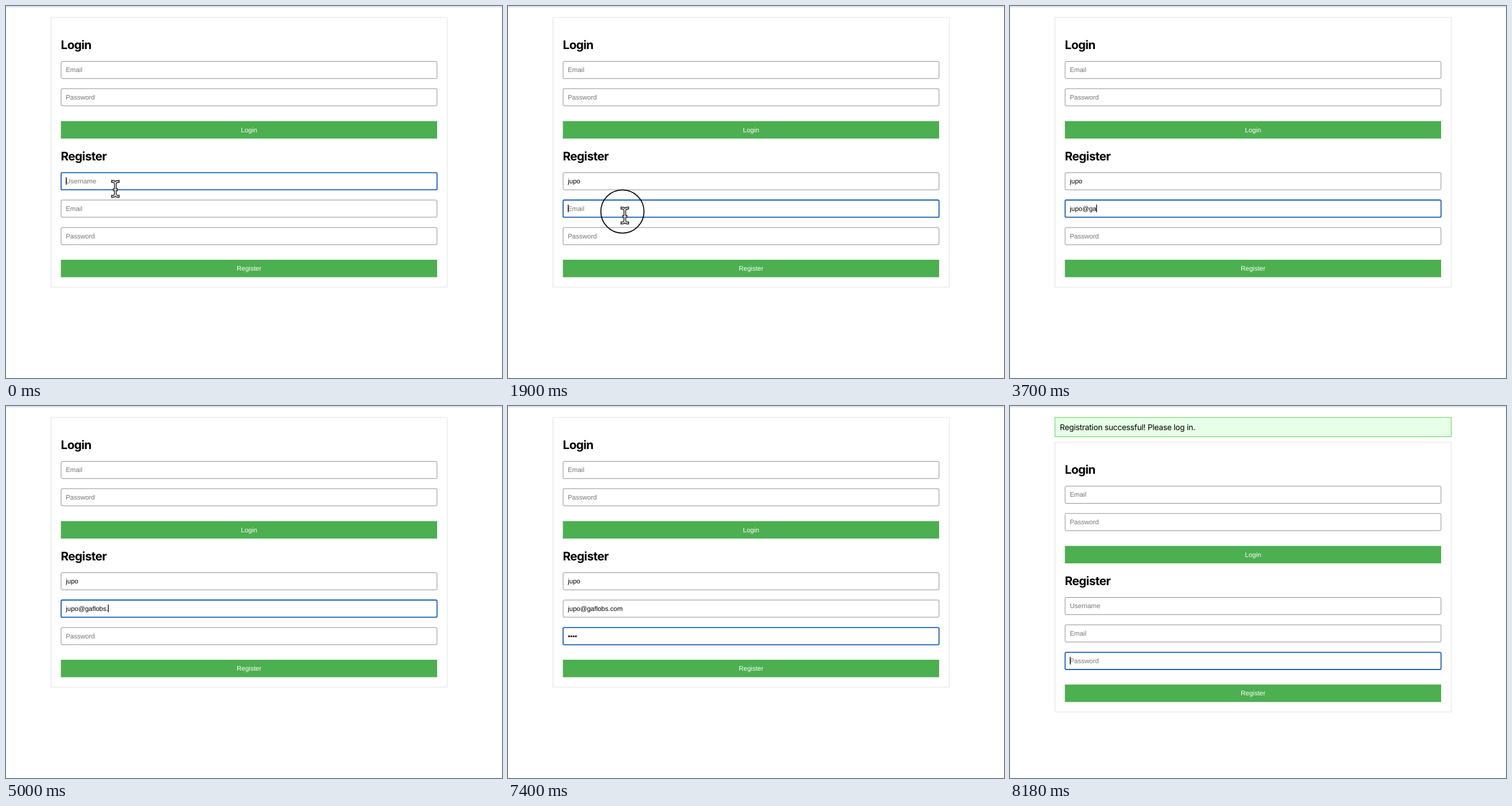
Animation of 864 by 648 pixels, one loop 8.35 s. Source, as an HTML page:

```html
<!DOCTYPE html>
<html lang="en">
<head>
<meta charset="utf-8">
<title>Registration form</title>
<style>
  html, body { margin: 0; height: 100%; overflow: hidden; background: #fff; }
  svg { display: block; width: 864px; height: 648px; }
  text { font: 11.52px "Liberation Sans", Arial, sans-serif; text-rendering: geometricPrecision; white-space: pre; }
  .heading { font: 700 20.74px Inter, sans-serif; letter-spacing: -.6px; }
  .message { font: 13.82px Inter, sans-serif; letter-spacing: -.28px; }
  .placeholder { fill: #757575; }
  .label { fill: #fff; text-anchor: middle; }
  .panel { fill: none; stroke: #e2e2e2; }
  .notice { fill: #e6ffe6; stroke: #62c862; }
  .button { fill: #4caf50; }
  .field { fill: #fff; stroke: #8e8e8e; }
  .focus { stroke: #1a62b5; stroke-width: 1.8; }
  .ring { fill: none; stroke: #000; stroke-width: 1.7; }
  .pointer { fill: none; stroke-linecap: square; stroke-linejoin: round; }
</style>
</head>
<body>
<svg id="stage" viewBox="0 0 864 648"></svg>
<script>
const LOOP = 8350;
const NAME = 'jupo';
const EMAIL = 'jupo@gaflobs.com';
const BULLETS = '••••';
const TEXT_X = 104.2;
const stage = document.getElementById('stage');

// One keystroke every 100 ms; typing shows the caret and hides the pointer.
const type = (start, key, text, from, to = from) =>
  Array.from({ length: to - from + 1 }, (_, i) =>
    [start + i * 100, { [key]: text.slice(0, from + i), caret: true, pointer: null }]);
const caretOn = time => [time, { caret: true }];
const caretOff = time => [time, { caret: false }];
const move = (time, x, y, more) => [time, { pointer: [x, y], ...more }];

const events = [
  move(0, 190.5, 318.5, {
    focus: 'name', caret: true, name: '', email: '', password: '', ring: null, done: false
  }),
  caretOff(300), caretOn(500),
  ...type(600, 'name', NAME, 1, 3),
  caretOff(1100),
  ...type(1300, 'name', NAME, 4),
  move(1500, 196.5, 332, { caret: false }),
  move(1600, 199.5, 348),
  move(1700, 199.5, 354),
  move(1800, 199.5, 358),
  move(1900, 203.5, 365, { focus: 'email', caret: true, ring: [199.3, 358] }),
  [2000, { ring: null }],
  caretOff(2200), caretOn(2400),
  ...type(2600, 'email', EMAIL, 1),
  ...type(2800, 'email', EMAIL, 2, 3),
  ...type(3100, 'email', EMAIL, 4),
  caretOff(3400),
  ...type(3500, 'email', EMAIL, 5, 12),
  caretOff(4500),
  ...type(4600, 'email', EMAIL, 13, 14),
  caretOff(4900),
  ...type(5000, 'email', EMAIL, 13),
  caretOff(5200), caretOn(5400),
  ...type(5700, 'email', EMAIL, 15, 16),
  move(6000, 205, 396, { caret: false }),
  move(6100, 206.5, 415.5),
  move(6200, 207, 416.5, { focus: 'password', caret: true, ring: [206.5, 411.7] }),
  [6300, { ring: null }],
  caretOff(6500), caretOn(6700),
  ...type(6800, 'password', BULLETS, 1, 3),
  ...type(7200, 'password', BULLETS, 4),
  caretOff(7400),
  [7600, { done: true, name: '', email: '', password: '', caret: true }],
  caretOff(7900), caretOn(8180)
];

const box = (cls, x, y, w, h, r = 0) =>
  `<rect class="${cls}" x="${x}" y="${y}" width="${w}" height="${h}" rx="${r}"/>`;
const text = (cls, x, y, content) => `<text class="${cls}" x="${x}" y="${y}">${content}</text>`;
const button = (y, label) =>
  box('button', 95.6, y, 655.4, 30.4) + text('label', 423.4, y + 19.1, label);

function field(y, placeholder, value = '', focused = false, caret = false) {
  return box(focused ? 'field focus' : 'field', 96, y, 654.8, 29.9, 2)
    + text(value ? 'value' : 'placeholder', TEXT_X, y + 18.7, value || placeholder)
    + (focused && caret ? `<rect class="caret" data-value="${value}" x="${TEXT_X}" y="${y + 7.9}" width="1.3" height="13.3"/>` : '');
}

function pointer([x, y]) {
  const shape = 'M-5 -13Q0 -13 0 -8Q0 -13 5 -13M0 -8V8M-5 13Q0 13 0 8Q0 13 5 13M-2 1.5H2';
  const layer = (color, width) =>
    `<path class="pointer" d="${shape}" stroke="${color}" stroke-width="${width}"/>`;
  return `<g transform="translate(${x} ${y})">${layer('#333', 4.8)}${layer('#eee', 1.7)}</g>`;
}

function draw(s) {
  const input = (y, key, placeholder) => field(y, placeholder, s[key], s.focus === key, s.caret);
  stage.innerHTML = box('rule', 0, 1, 864, 1).replace('/>', ' fill="#c4c4c4"/>')
    + (s.done ? box('notice', 78.3, 19.9, 690.3, 33.6)
      + text('message', 86.8, 42.2, 'Registration successful! Please log in.') : '')
    + `<g transform="translate(0 ${s.done ? 43.2 : 0})">`
    + box('panel', 78.3, 19.9, 690.3, 469.9)
    + text('heading', 95.6, 74.8, 'Login')
    + field(96.5, 'Email') + field(144, 'Password') + button(200.5, 'Login')
    + text('heading', 95.6, 268.6, 'Register')
    + input(290.3, 'name', 'Username')
    + input(338, 'email', 'Email')
    + input(385.9, 'password', 'Password')
    + button(442, 'Register') + '</g>'
    + (s.ring ? `<circle class="ring" cx="${s.ring[0]}" cy="${s.ring[1]}" r="37.6"/>` : '')
    + (s.pointer ? pointer(s.pointer) : '');

  const caret = stage.querySelector('.caret');
  if (caret && caret.dataset.value) {
    const width = caret.previousElementSibling.getComputedTextLength();
    caret.setAttribute('x', TEXT_X + width - .4);
  }
}

let shown = 0;
function frame() {
  const time = performance.now() % LOOP;
  const past = events.filter(([start]) => start <= time);
  if (past.length !== shown) {
    shown = past.length;
    draw(Object.assign({}, ...past.map(([, change]) => change)));
  }
  requestAnimationFrame(frame);
}
frame();
</script>
</body>
</html>
```
